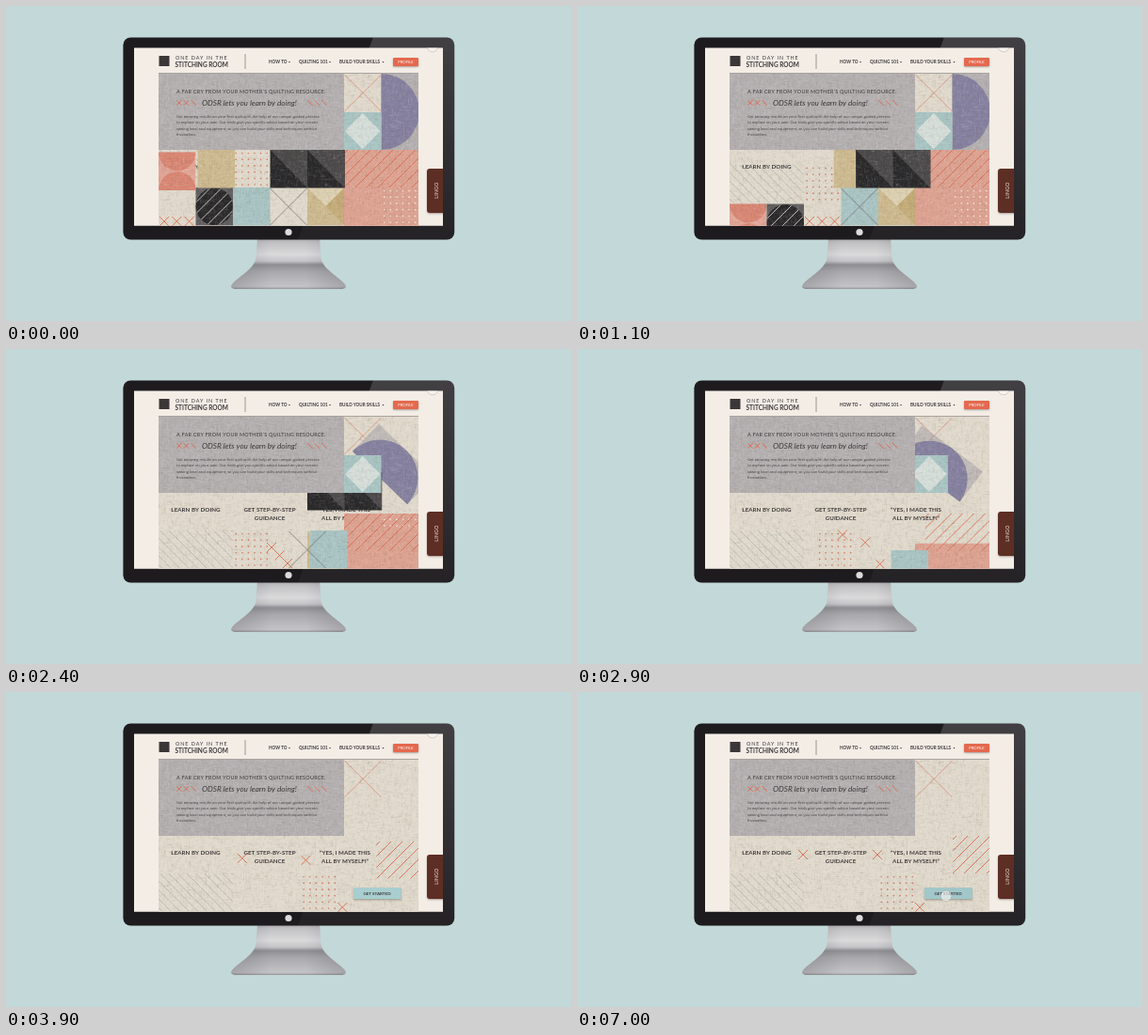
Recreate the animation shown at these times as an HTML page with a canvas. Size 600 px wide and 335 px high, loop 7100 ms.

```html
<!DOCTYPE html>
<html lang="en">
<head>
<meta charset="utf-8">
<title>Quilting site</title>
<style>
html, body { margin: 0; width: 100%; height: 100%; overflow: hidden; background: #c3d8d8; }
canvas { display: block; width: 600px; height: 335px; }
</style>
</head>
<body>
<canvas id="stage"></canvas>
<script>
const LOOP = 7100, TILE = 39.5, ROW = 40.5;
const RED = '#dc6a4e', LINEN = '#e0d9cc', GREY = '#b4afb0', CORAL = '#dda291',
  BLUE = '#a8c4c3', TAN = '#cdb98f', BLACK = '#2a292b', PURPLE = '#85809f', INK = '#3b3739';
const LATO = 'Lato, sans-serif', OPEN = '"Open Sans", sans-serif';
const canvas = document.getElementById('stage');
const dpr = window.devicePixelRatio || 1;
canvas.width = 600 * dpr;
canvas.height = 335 * dpr;
const ctx = canvas.getContext('2d');

// Eased value at time t from stops [time, a, b, ...].
function key(t, ...stops) {
  if (t <= stops[0][0]) return stops[0].slice(1);
  for (let i = 1; i < stops.length; i++) {
    const a = stops[i - 1], b = stops[i];
    if (t < b[0]) {
      const u = (t - a[0]) / (b[0] - a[0]), e = u * u * (3 - 2 * u);
      return a.slice(1).map((v, k) => v + (b[k + 1] - v) * e);
    }
  }
  return stops[stops.length - 1].slice(1);
}

function rect(x, y, w, h, color, r = 0) {
  ctx.fillStyle = color;
  ctx.beginPath();
  ctx.roundRect(x, y, w, h, r);
  ctx.fill();
}
function poly(color, ...p) {
  ctx.fillStyle = color;
  ctx.beginPath();
  for (let i = 0; i < p.length; i += 2) ctx.lineTo(p[i], p[i + 1]);
  ctx.fill();
}
function disc(x, y, r, color, from = 0, to = Math.PI * 2) {
  ctx.fillStyle = color;
  ctx.beginPath();
  ctx.arc(x, y, r, from, to);
  ctx.fill();
}
function line(x1, y1, x2, y2, color, w = 0.8) {
  ctx.strokeStyle = color;
  ctx.lineWidth = w;
  ctx.beginPath();
  ctx.moveTo(x1, y1);
  ctx.lineTo(x2, y2);
  ctx.stroke();
}
function cross(x, y, r, color, w) {
  line(x - r, y - r, x + r, y + r, color, w);
  line(x - r, y + r, x + r, y - r, color, w);
}
function group(draw, x = 0, y = 0, turn = 0) {
  ctx.save();
  ctx.translate(x, y);
  ctx.rotate(turn * Math.PI / 180);
  draw();
  ctx.restore();
}
function clipRect(x, y, w, h) {
  ctx.beginPath();
  ctx.rect(x, y, w, h);
  ctx.clip();
}
function fade(x1, y1, x2, y2, ...stops) {
  const g = ctx.createLinearGradient(x1, y1, x2, y2);
  stops.forEach(s => g.addColorStop(...s));
  return g;
}
function text(s, x, y, size, o = {}) {
  ctx.font = `${o.style || ''} ${o.weight || 400} ${size}px ${o.font || LATO}`;
  ctx.letterSpacing = (o.gap || 0) + 'px';
  ctx.textAlign = o.align || 'left';
  ctx.textBaseline = 'alphabetic';
  ctx.fillStyle = o.color || INK;
  ctx.fillText(s, x, y);
}
function dots(x, y, color, r = 0.85) {
  for (let i = 0; i < 6; i++)
    for (let j = 0; j < 6; j++) disc(x + 3.2 + i * 6.6, y + 3.5 + j * 6.7, r, color);
}
// Parallel diagonals inside a box; dir 1 is "\", -1 is "/".
function stripes(x, y, w, h, step, dir, color, width) {
  group(() => {
    clipRect(x, y, w, h);
    for (let k = -h + 4; k < w; k += step)
      line(x + k, dir > 0 ? y : y + h, x + k + h, dir > 0 ? y + h : y, color, width);
  });
}
function softShadow(draw) {
  ctx.save();
  ctx.shadowColor = 'rgba(60,40,30,.4)';
  ctx.shadowBlur = 2 * dpr;
  ctx.shadowOffsetY = dpr;
  draw();
  ctx.restore();
}

// Woven cloth: short, faint, seeded threads along both directions.
const weave = document.createElement('canvas');
weave.width = 276 * 2;
weave.height = 162 * 2;
{
  const w = weave.getContext('2d');
  let seed = 11;
  const rnd = () => (seed = seed * 16807 % 2147483647) / 2147483647;
  for (let i = 0; i < 14000; i++) {
    const flat = rnd() < 0.5, len = 3 + rnd() * 8;
    w.fillStyle = rnd() < 0.5 ? 'rgba(90,75,60,.06)' : 'rgba(255,255,250,.07)';
    w.fillRect(Math.floor(rnd() * 560) - 8, Math.floor(rnd() * 330) - 6, flat ? len : 1.5, flat ? 1.5 : len);
  }
}

function stand() {
  ctx.fillStyle = fade(0, 247, 0, 301, [0, '#a9a8ab'], [.1, '#c3c2c5'], [.32, '#dadadb'],
    [.45, '#c4c3c6'], [.52, '#8e8d92'], [.66, '#a9a8ac'], [.95, '#c4c3c6'], [1, '#98979b']);
  ctx.beginPath();
  ctx.moveTo(267, 246);
  ctx.lineTo(265.5, 268);
  ctx.bezierCurveTo(264, 280, 246, 288, 240, 296);
  ctx.quadraticCurveTo(237, 300, 243, 301);
  ctx.lineTo(357, 301);
  ctx.quadraticCurveTo(363, 300, 360, 296);
  ctx.bezierCurveTo(354, 288, 336, 280, 334.5, 268);
  ctx.lineTo(333, 246);
  ctx.fill();
  ctx.fillStyle = fade(239, 0, 361, 0, [0, 'rgba(80,78,84,.25)'], [.35, 'rgba(80,78,84,0)'],
    [.65, 'rgba(80,78,84,0)'], [1, 'rgba(80,78,84,.25)']);
  ctx.fill();
}

function monitor() {
  rect(0, 0, 600, 335, '#c3d8d8');
  stand();
  group(() => {
    ctx.beginPath();
    ctx.roundRect(124.4, 33.4, 351.8, 215.2, 8);
    ctx.clip();
    rect(124, 33, 353, 216, '#1d1b1e');
    poly(fade(0, 33, 0, 248, [0, 'rgba(255,255,255,.16)'], [1, 'rgba(255,255,255,.03)']),
      390, 33, 477, 33, 477, 249, 310, 249);
  });
  disc(300, 240.5, 3.6, '#dcdcde');
  rect(136, 44.5, 328, 189.3, '#f3ede6');
}

function header() {
  rect(162.5, 53, 11, 11, INK);
  text('ONE DAY IN THE', 180, 57, 5.4, { gap: 0.95 });
  text('STITCHING ROOM', 179.5, 65, 6.5, { weight: 700 });
  line(254, 51, 254, 67, '#77716f', 0.7);
  [['HOW TO', 279, 301], ['QUILTING 101', 311, 344], ['BUILD YOUR SKILLS', 354, 400.5]].forEach(([s, x, end]) => {
    text(s, x, 61.3, 4.6, { weight: 700 });
    poly(INK, end - 1, 58.9, end + 1, 58.9, end, 60.4);
  });
  softShadow(() => rect(411, 55, 27, 9, '#e4694e', 1.2));
  text('PROFILE', 424.5, 61.1, 4.2, { align: 'center', color: '#fff' });
  line(162, 71.5, 438, 71.5, '#8a8481', 0.7);
}

function lingo() {
  softShadow(() => rect(447, 173, 20, 47, '#5d2e24', 3));
  group(() => text('LINGO', 0, 0, 5.2, { align: 'center', color: '#f3e9e2', gap: 0.25 }), 459, 196, -90);
}

function labels() {
  const o = { weight: 700, align: 'center', gap: 0.05 };
  text('LEARN BY DOING', 201.5, 173, 6.2, o);
  text('GET STEP-BY-STEP', 280, 173, 6.2, o);
  text('GUIDANCE', 280, 181.5, 6.2, o);
  text('“YES, I MADE THIS', 360, 173, 6.2, o);
  text('ALL BY MYSELF!”', 360, 181.5, 6.2, o);
}

function button(t) {
  const [show] = key(t, [3000, 0], [3600, 1]);
  if (!show) return;
  const [press] = key(t, [6100, 0], [6300, 1]);
  ctx.save();
  ctx.globalAlpha = show;
  softShadow(() => rect(369, 208, 50.5, 12.2, press > 0.5 ? '#a2c7c9' : '#a9cecf', 0.8));
  text('GET STARTED', 394, 215.9, 4.5, { weight: 700, align: 'center' });
  ctx.restore();
}

function flyingCrosses(t) {
  const ends = [[282, 211, 282, 188, 240, 173], [290.5, 219.5, 317, 196, 319, 173], [299, 228, 338, 229, 364, 229]];
  ends.forEach((p, i) => {
    const x = 168 + i * 13.3;
    const [cx, cy] = key(t, [0, x, 229], [400, x + 79, 229], [1700, x + 79, 229],
      [2400, p[0], p[1]], [3300, p[2], p[3]], [4200, p[4], p[5]]);
    cross(cx, cy, 5, RED, 0.9);
  });
}

function coralBlock(t) {
  const [top] = key(t, [1700, 153], [2400, 175], [3300, 229], [3500, 240]);
  const [dotY] = key(t, [1700, 193], [2400, 151]);
  group(() => {
    clipRect(359, top, 79, 81);
    rect(359, top, 79, 81, CORAL);
    dots(398.5, dotY, '#f3e3d6');
  });
  const [x, y] = key(t, [1700, 359, 153], [2400, 359, 175], [3300, 377, 175], [4200, 399, 153]);
  stripes(x, y, 438 - x, 40, 12, -1, RED, 0.9);
}

function lowerTiles(t) {
  const [hatchY] = key(t, [800, 153], [1500, 193]);
  stripes(162, hatchY, 79, 40.5, 9.5, 1, '#a9b3af', 0.7);
  const [dx, dy] = key(t, [800, 241, 153], [1500, 241, 193], [2600, 241, 193], [3300, 275, 193], [4100, 320, 193]);
  rect(dx, dy, TILE, ROW, LINEN);
  dots(dx, dy, '#d2806a');
  flyingCrosses(t);

  const [coralY] = key(t, [0, 155.5], [400, 193], [800, 193], [1500, 237]);
  group(() => {
    clipRect(0, 0, TILE, ROW);
    rect(0, 0, TILE, ROW, '#e2a596');
    disc(TILE / 2, 0, TILE / 2, '#d98673');
    disc(TILE / 2, ROW, TILE / 2, '#d98673');
  }, 162, coralY);

  const [discY] = key(t, [800, 193], [1500, 237]);
  group(() => {
    rect(0, 0, TILE, ROW, '#615e60');
    disc(TILE / 2, ROW / 2, 19.7, BLACK);
    ctx.clip();
    stripes(0, 0, TILE, ROW, 12, -1, '#d9d4cd', 0.9);
  }, 201.5, discY);

  if (t < 2950) {
    const [y] = key(t, [2400, 193], [2900, 236]);
    rect(320, y, TILE, ROW, TAN);
    poly('#ddd0b2', 320, y, 359.5, y, 339.7, y + 20);
    poly('#c4ab78', 359.5, y, 359.5, y + ROW, 339.7, y + 20);
  }
  coralBlock(t);
  const [bx, by] = key(t, [0, 241, 193], [400, 280.5, 193], [1700, 280.5, 193],
    [2400, 323, 193], [3300, 341, 229], [3600, 345, 240]);
  rect(bx, by, TILE, ROW, BLUE);
  const [xx, alpha] = key(t, [1700, 300, 1], [2400, 320, 1], [2800, 326, 0]);
  ctx.globalAlpha = alpha;
  cross(xx, 213.5, 19.7, '#6d6768', 0.7);
  ctx.globalAlpha = 1;

  if (t < 1500) {
    const [x] = key(t, [0, 203.5], [400, 241], [800, 241], [1500, 321]);
    rect(x, 153, TILE, ROW, TAN);
    dots(x, 153, '#dccda6', 0.6);
  }
}

function upperTiles(t) {
  cross(379, 92.5, 19.5, '#d98a74', 0.8);
  // The half-circle keeps its own grey patch while it tumbles away.
  const [x, y, turn, alpha] = key(t, [1700, 398.5, 112.5, 0, 1], [2400, 397, 137, -46, 0.75],
    [3300, 358, 139, -58, 0.75], [4100, 300, 112, -90, 0.75]);
  group(() => {
    ctx.globalAlpha = alpha;
    rect(0, -40.5, 40.5, 81, GREY);
    ctx.globalAlpha = 1;
    disc(0, 0, 40.5, PURPLE, -Math.PI / 2, Math.PI / 2);
  }, x, y, turn);

  if (t < 2800) {
    const [kx, ky] = key(t, [800, 280.5, 153], [1500, 320, 153], [1900, 320, 153], [2400, 320, 131], [2700, 320, 113]);
    for (const k of [kx, kx + TILE]) {
      rect(k, ky, TILE + 0.2, ROW, BLACK);
      poly('#4b494a', k, ky, k + TILE, ky, k + TILE, ky + ROW);
    }
  }
  const [b] = key(t, [2700, 359], [3300, 341.5], [3800, 318]);
  rect(b, 113, TILE, 40, BLUE);
  poly('#d6deda', b + 19.7, 114, b + 38.5, 133, b + 19.7, 152, b + 1, 133);
}

function panelText() {
  text('A FAR CRY FROM YOUR MOTHER’S QUILTING RESOURCE.', 181, 93, 5.4, { gap: 0.3 });
  text('ODSR lets you learn by doing!', 208, 105.5, 8.2, { style: 'italic' });
  cross(184, 103, 2.8, RED, 0.9);
  cross(191.5, 103, 2.8, RED, 0.9);
  for (const x of [196.5, 320, 327.5, 335]) line(x, 100, x + 5.5, 106, RED, 0.9);
  ['Get amazing results on your first quilt with the help of our unique guided process',
    'to explore on your own. Our tools give you specific advice based on your current',
    'sewing level and equipment, so you can build your skills and techniques without',
    'frustration.'].forEach((s, i) => text(s, 181, 119.3 + i * 6.1, 4.03, { font: OPEN, color: '#433e41' }));
}

function cursor(t) {
  const u = Math.min(1, Math.max(0, (t - 5000) / 900));
  const p = 1 - (1 - u) ** 2, q = 1 - p;
  const x = q * q * 453 + 2 * p * q * 408 + p * p * 392;
  const y = q * q * 43 + 2 * p * q * 116 + p * p * 217;
  disc(x, y, 5.8, u > 0 && u < 1 ? 'rgba(250,248,244,.85)' : 'rgba(250,248,244,.6)');
  ctx.strokeStyle = 'rgba(150,145,145,.5)';
  ctx.lineWidth = 0.7;
  ctx.stroke();
}

function render(t) {
  ctx.setTransform(dpr, 0, 0, dpr, 0, 0);
  monitor();
  ctx.save();
  clipRect(136, 44.5, 328, 189.3);
  header();
  ctx.save();
  clipRect(162, 72, 276, 162);
  rect(162, 72, 276, 162, LINEN);
  labels();
  lowerTiles(t);
  upperTiles(t);
  rect(162, 72, 197, 81, GREY);
  ctx.drawImage(weave, 162, 72, 276, 162);
  panelText();
  button(t);
  ctx.restore();
  lingo();
  cursor(t);
  ctx.restore();
}

const start = performance.now();
function tick(now) {
  render(Math.max(0, now - start) % LOOP);
  requestAnimationFrame(tick);
}
render(0);
requestAnimationFrame(tick);
</script>
</body>
</html>
```
